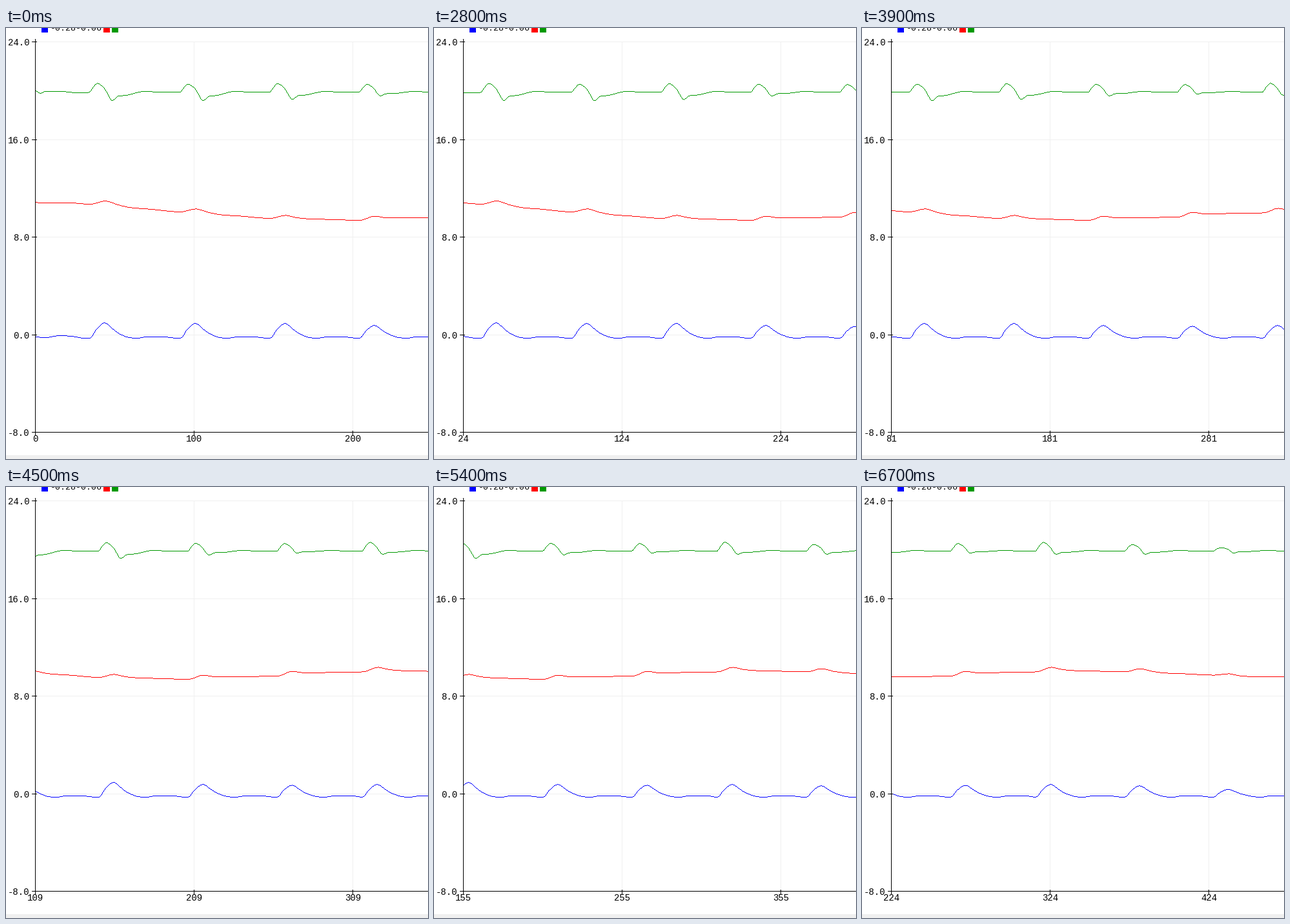
These frames come from a looping animation (654 px wide and 669 px high, 6.8 s). A matplotlib script:

```python
import numpy as np
import matplotlib.pyplot as plt
from matplotlib.animation import FuncAnimation
from matplotlib.collections import LineCollection
from matplotlib.patches import Rectangle

W, H, DPI = 654, 669, 100
STEP_MS, LOOP_MS = 100, 6800
PX = 72 / DPI                 # one pixel in points
X0, DX = 45, 2.46             # left axis, pixels per sample
Y0, DY = 476, 18.92           # row of value 0, pixels per unit
BLUE, RED, GREEN, GRID = "#0000ff", "#ff0000", "#009900", "#f0f0f0"

# Scroll updates, in tenths of a second
UPDATES = [28, 30, 32, 35, 37, 39, 42, 44, 45, 46, 49, 51, 54, 57, 58, 61,
           62, 65, 67]

# Each beat: sample, blue height, green rise and dip, red level and rise
BEATS = [(43.7, 1.15, .65, .77, 10.73, .26),
         (100.8, 1.10, .58, .79, 10.10, .24),
         (157.3, 1.10, .63, .69, 9.57, .24),
         (213.6, .93, .58, .40, 9.41, .34),
         (269.7, .87, .55, .24, 9.67, .40),
         (323.4, .93, .66, .34, 10.02, .37),
         (379.5, .82, .48, .34, 10.02, .26),
         (435.3, .53, .21, .24, 9.75, .11)]
LAST_LEVEL = 9.57


def smooth(knots, at):
    """Monotone cubic through (x, y) knots."""
    xs, ys = np.array(knots, float).T
    h = np.diff(xs)
    d = np.diff(ys) / h
    a, b = d[:-1], d[1:]
    same = a * b > 0
    m = np.zeros(len(xs))
    m[1:-1][same] = 2 * a[same] * b[same] / (a + b)[same]
    i = np.clip(np.searchsorted(xs, at, side="right") - 1, 0, len(h) - 1)
    t = (at - xs[i]) / h[i]
    return ((1 + 2 * t) * (1 - t) ** 2 * ys[i] + t * t * (3 - 2 * t) * ys[i + 1]
            + h[i] * t * (1 - t) * ((1 - t) * m[i] - t * m[i + 1]))


def blue_beat(height):
    rise = [(-5.5, .48), (-1.3, .95), (0, 1), (1.2, .95), (4.5, .62), (8, .3),
            (11, .12)]
    rest = [(15, -.05), (20, -.12), (27, 0), (36, 0), (42, -.07)]
    return ([(-10.5, -.29), (-8.5, -.21)]
            + [(s, height * v - .15) for s, v in rise]
            + [(s, v - .15) for s, v in rest])


def green_beat(up, dip):
    lag = 2.2 + 3.2 * dip
    rel = [(-9.8, -.1), (-7, .55 * up), (-4.7, up), (-3, .85 * up), (0, .3 * up),
           (lag / 2, -.4 * dip), (lag, -dip), (lag + 4, -.52 * dip),
           (13, -.45 * dip), (25, -.02), (38, -.1)]
    return [(s, 20 + v) for s, v in rel]


def red_beat(level, rise, after):
    peak = level + rise
    sag = .185
    drop = peak - sag - after
    climb = [(-9, 0), (-5, .4), (-1.5, .9), (.5, 1)]
    fall = [(4.5, .5, .06), (8, .85, .2), (17, 1, .52), (28, 1, .68)]
    return ([(s, level + rise * v) for s, v in climb]
            + [(s, peak - sag * f - drop * g) for s, f, g in fall])


def build():
    blue = [(0, -.13), (5, -.23), (16, -.05), (22, -.1)]
    red = [(0, 10.9), (2, 10.84), (21, 10.84)]
    green = [(0, 20.03), (3, 19.82), (7, 20), (14, 20), (27, 19.87)]
    levels = [b[4] for b in BEATS[1:]] + [LAST_LEVEL]
    for (at, height, up, dip, level, rise), after in zip(BEATS, levels):
        for curve, beat in [(blue, blue_beat(height)),
                            (green, green_beat(up, dip)),
                            (red, red_beat(level, rise, after))]:
            curve += [(at + s, v) for s, v in beat]
    return (blue, BLUE), (red, RED), (green, GREEN)


def first_sample(frame):
    n = sum(u <= frame for u in UPDATES)
    if n == 0:
        return int(frame >= 24)
    return int(12.5 + 11.5 * n - 6.5 * (n > 8))


fig = plt.figure(figsize=(W / DPI, H / DPI), dpi=DPI, facecolor="white")
ax = fig.add_axes([0, 0, 1, 1])
ax.set_xlim(0, W)
ax.set_ylim(H, 0)
ax.axis("off")


def box(x, y, w, h, color, z=1):
    ax.add_patch(Rectangle((x, y), w, h, fc=color, lw=0, antialiased=False,
                           zorder=z))


def text(x, y, s, ha, size=14):
    return ax.text(x, y, s, ha=ha, va="baseline", family="Liberation Mono",
                   size=size * PX, color="black", zorder=5)


X_TICKS = [45, 291, 537]
for value in (24, 16, 8, 0, -8):
    y = int(Y0 - DY * value)
    box(X0, y, W - X0, 1, GRID)
    box(40, y, 8, 1, "black", 4)
    text(36.5, y + 6, f"{value:.1f}", "right")
for x in X_TICKS:
    box(x, 22, 1, 605, GRID)
    box(x, 625, 1, 8, "black", 4)
box(X0, 17, 1, 611, "black", 4)
box(X0, 627, W - X0, 1, "black", 4)
box(0, 663, W, 6, GRID)

for x, color in [(55, BLUE), (151, RED), (164, GREEN)]:
    box(x, 0, 10, 7, color)
text(68.5, 4, "-0.28-0.06", "left", 13.33)

samples = np.arange(475)
columns = np.arange(X0, W + 1)
curves = []
for knots, color in build():
    line = LineCollection([], colors=color, linewidths=.3, antialiased=False,
                          zorder=3)
    line.set_snap(False)
    ax.add_collection(line, autolim=False)
    curves.append((line, Y0 - DY * smooth(knots, samples)))

labels = [text(x + 0.5, 642, "", "center") for x in X_TICKS]


def pixel_line(ys, shift):
    """One short upright stroke per column: a crisp one-pixel line."""
    rows = np.rint(np.interp((columns - X0) / DX + shift, samples, ys))
    here, after = rows[:-1], rows[1:]
    top = np.minimum(here, after + 1) + .1
    bottom = np.maximum(here, after - 1) + .9
    x = columns[:-1] + .5
    return np.stack([np.stack([x, top], 1), np.stack([x, bottom], 1)], 1)


def draw(frame):
    first = first_sample(frame)
    for line, ys in curves:
        line.set_segments(pixel_line(ys, max(first - 1, 0)))
    for k, label in enumerate(labels):
        label.set_text(str(first + 100 * k))
    return [c[0] for c in curves] + labels


anim = FuncAnimation(fig, draw, frames=LOOP_MS // STEP_MS, interval=STEP_MS,
                     init_func=lambda: draw(0), repeat=True, repeat_delay=0,
                     blit=False)
plt.show()
```
